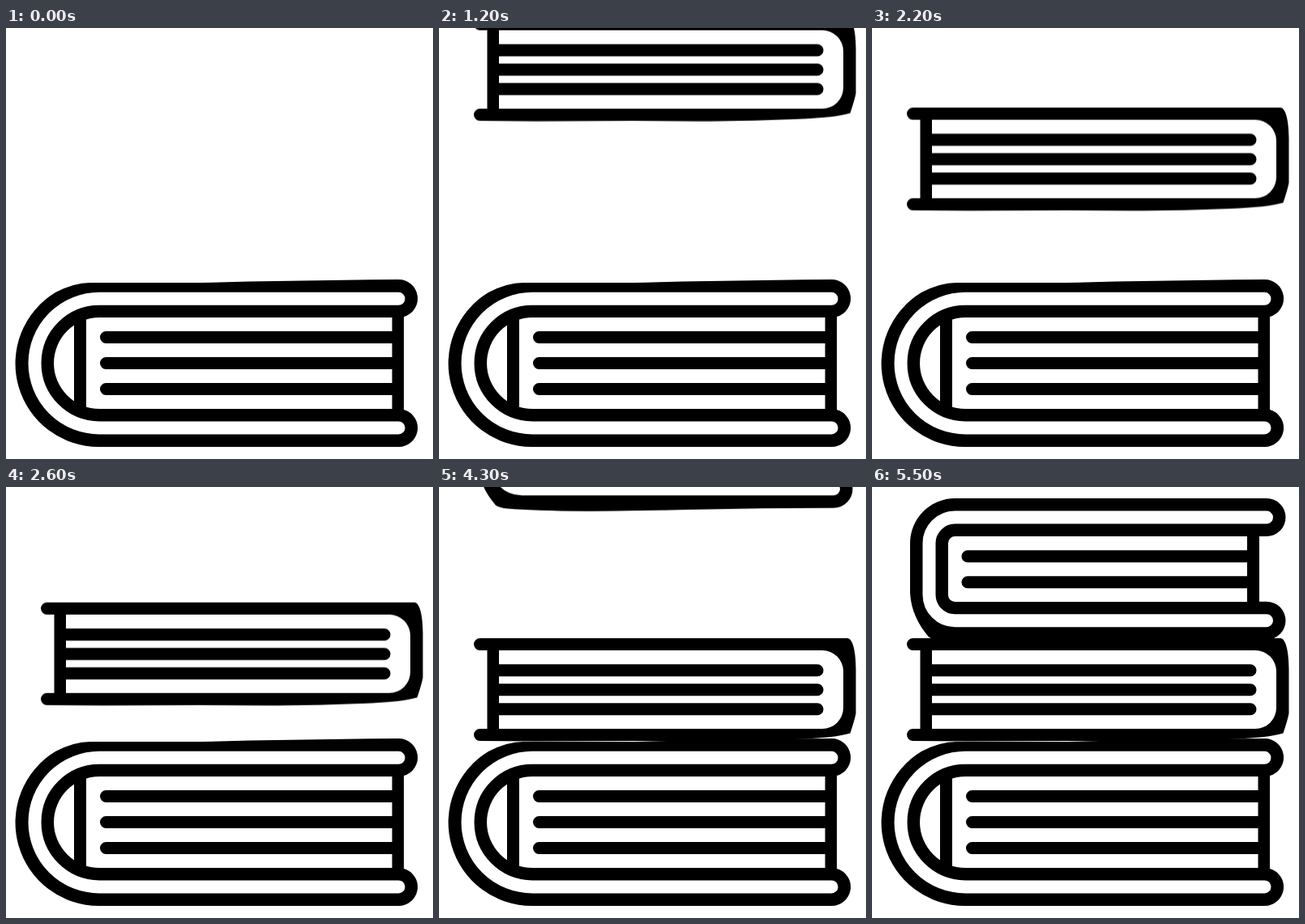
An HTML page that plays this animation: 527x533 px, repeating every 6000 ms.

```html
<!DOCTYPE html>
<html lang="en">
<head>
<meta charset="utf-8">
<title>Stack of books</title>
<style>
  html, body { margin: 0; width: 100%; height: 100%; overflow: hidden; background: #fff; }
  svg { display: block; width: 527px; height: 533px; }
  .white { fill: #fff; }
  .slot, .line { fill: none; stroke-linecap: round; }
  .slot { stroke: #fff; stroke-width: 16; }
  .line { stroke: #000; stroke-width: 15; }
  .bar { stroke: #000; stroke-width: 15; }
</style>
</head>
<body>
<svg viewBox="0 0 527 533">
  <g id="bottom">
    <path d="M484.5 518H115A103 103 0 0 1 61 327Q84 315 104 315H240L300 313.6L450 311.2L484.5 311
      A23.5 23.5 0 0 1 491 357.1V471.9A23.5 23.5 0 0 1 484.5 518Z"/>
    <path class="slot" d="M484.5 334.8H115.3A79.8 79.8 0 0 0 115.3 494.4H484.5"/>
    <path class="white" d="M476.5 358H115.5A56.5 56.5 0 0 0 115.5 471H476.5Z"/>
    <path class="bar" d="M91.5 356V473"/>
    <path class="line" d="M123.5 382.5H478M123.5 414.5H478M123.5 446.5H478"/>
  </g>
  <g id="middle">
    <path d="M50.5 187H504C511 187 514.5 205 514.5 225V280Q513 288 507.5 304.5Q490 310 440 312
      Q380 314.8 320 314.4L240 313.9L120 314.4L50.5 314A7.5 7.5 0 0 1 50.5 299H59.5V202H50.5
      A7.5 7.5 0 0 1 50.5 187Z"/>
    <path class="white" d="M74 202H473A26 26 0 0 1 499 228V273A26 26 0 0 1 473 299H74Z"/>
    <path class="line" d="M73 226.7H467M73 250.7H467M73 274.7H467"/>
  </g>
  <g id="top">
    <path d="M487 14H102.5A55.5 55.5 0 0 0 47 69.5V131C48 152 57 170 70 185.5Q75 188.5 84 189.5
      Q120 192.4 180 192.7Q220 192.6 300 191L400 189.3L487 188.7A23.5 23.5 0 0 0 487 141.7H478V61H487
      A23.5 23.5 0 0 0 487 14Z"/>
    <path class="slot" d="M487 37.6H102.5A32 32 0 0 0 70.5 69.6V133.2A32 32 0 0 0 102.5 165.2H487"/>
    <path class="white" d="M463 61H102.5A8.5 8.5 0 0 0 94 69.5V133.4A8.5 8.5 0 0 0 102.5 141.9H463Z"/>
    <path class="line" d="M118 85.8H464M118 117.8H464"/>
  </g>
</svg>
<script>
  const LOOP = 6000, TICK = 100;

  // Drops a book at a constant speed, in ticks, then lets it rest.
  function drop(id, start, land, perTick) {
    const ticks = (land - start) / TICK;
    const high = `translateY(${-perTick * ticks}px)`;
    const rest = 'translateY(0px)';
    document.getElementById(id).animate([
      { offset: 0, transform: high },
      { offset: start / LOOP, transform: high, easing: `steps(${ticks}, end)` },
      { offset: land / LOOP, transform: rest },
      { offset: 1, transform: rest }
    ], { duration: LOOP, iterations: Infinity, delay: -1 });
  }

  drop('middle', 0, 3000, 11.07);
  drop('top', 4000, 5500, 13.57);
</script>
</body>
</html>
```
